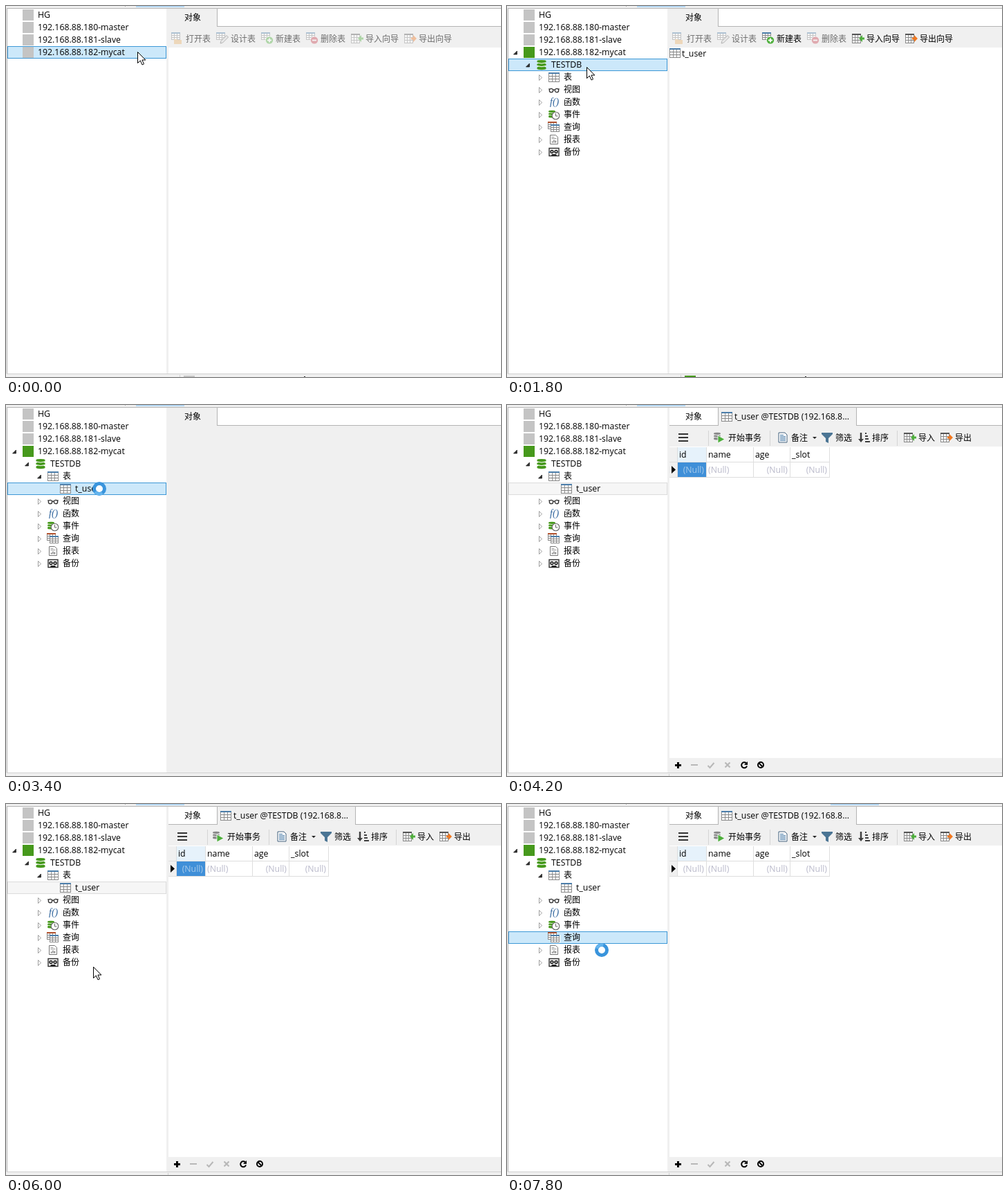
Animation, 716 px wide and 536 px high, one loop 8 s. Source, as an HTML page:

```html
<!DOCTYPE html>
<html lang="zh-CN">
<head>
<meta charset="utf-8">
<title>Database browser</title>
<style>
html, body { margin: 0; width: 100%; height: 100%; overflow: hidden; background: #fff; }
svg { display: block; width: 716px; height: 536px; }
rect { shape-rendering: crispEdges; }
text { font: 12.3px "Open Sans", "Noto Sans", "Noto Sans CJK SC", "Noto Sans CJK", sans-serif; white-space: pre; }
text.cjk { font: 12px "Noto Sans CJK SC", "Noto Sans CJK", sans-serif; }
text.fn { font: italic 14px "Liberation Serif", "Noto Serif", serif; }
</style>
</head>
<body>
<svg id="stage" viewBox="0 0 716 536"></svg>
<script>
const LOOP = 8000, STEP = 200;
const GREEN = '#46991c', GREY = '#c4c4c4', FACE = '#f0f0f0', EDGE = '#b4b4b4', DARK = '#404040';
const ORANGE = '#f07820', LIME = '#4eae3c', BLUE = '#4c7eaa';

const rect = (x, y, w, h, fill) => `<rect x="${x}" y="${y}" width="${w}" height="${h}" fill="${fill}"/>`;
const path = (d, fill = 'none', stroke = 'none', width = 1) =>
  `<path d="${d}" fill="${fill}" stroke="${stroke}" stroke-width="${width}"/>`;
const circle = (x, y, r, fill, stroke = 'none', width = 1) =>
  `<circle cx="${x}" cy="${y}" r="${r}" fill="${fill}" stroke="${stroke}" stroke-width="${width}"/>`;
const text = (x, y, s, fill = '#000', anchor = 'start') =>
  `<text x="${x}" y="${y}" fill="${fill}" text-anchor="${anchor}"${/[\u4e00-\u9fff]/.test(s) ? ' class="cjk"' : ''}>${s}</text>`;
const at = (x, y, body, opacity = 1, scale = 1) =>
  `<g transform="translate(${x} ${y}) scale(${scale})" opacity="${opacity}">${body}</g>`;

// Icons are drawn around the middle of a 16 px box; tables have three by three cells.
const table = (cellW = 4, cellH = 3, head = BLUE) => {
  const w = 3 * cellW + 4, h = 3 * cellH + 5, l = Math.floor(-w / 2), t = Math.floor(-h / 2);
  let s = rect(l, t, w, h, '#8a8a8a') + rect(l, t, w, 2, head);
  for (let r = 0; r < 3; r++)
    for (let c = 0; c < 3; c++)
      s += rect(l + 1 + c * (cellW + 1), t + 2 + r * (cellH + 1), cellW, cellH, '#fff');
  return s;
};
const database = color => [-4.7, 0, 4.7].map(y =>
  path(`M-6.5 ${y - .8}a6.5 1.6 0 0 1 13 0v1.8a6.5 1.6 0 0 1 -13 0z`, color)).join('') +
  path('M-6.5 -3.2q6.5 2.4 13 0M-6.5 1.5q6.5 2.4 13 0', 'none', '#fff', 1);
const page = (w, h, color) =>
  path(`M${-w / 2} ${-h / 2}h${w - 3}l3 3v${h - 3}h${-w}z`, '#fff', color);
const arrow = color => path('M1 -1.5h3v-3.5l5 5l-5 5v-3.5h-3z', color);
const backArrow = color => path('M9 -1.5h-3v-3.5l-5 5l5 5v-3.5h3z', color);
const sheet = at(-2, 0, table(3, 3, '#555'));
const badge = (color, mark) => circle(3, 2.5, 5.5, color, '#fff', .7) + path(mark, 'none', '#fff', 1.8);
const small = at(-2, -3, table(3, 2));

const icons = {
  open: small + path('M-5 1h4l1 1h6v6h-11z', '#eab46c'),
  design: small + path('M-3 7l1 -3.5l8 -8l2.5 2.5l-8 8z', '#e0e0e0', '#555'),
  create: small + badge(LIME, 'M0 2.5h6M3 -.5v6'),
  remove: small + badge('#c84250', 'M0 2.5h6'),
  import: sheet + backArrow(LIME),
  export: sheet + arrow(ORANGE),
  table: table(),
  view: circle(-4, 1, 2.7, '#fff', '#333', 1.3) + circle(4, 1, 2.7, '#fff', '#333', 1.3) +
    path('M-1.4 .5q1.4 -1.4 2.8 0M-7 0v-2M7 0v-2', 'none', '#333', 1.1),
  func: '<text class="fn" x="-6" y="4" fill="#2d629b">f()</text>',
  event: at(-3, -1, database(GREEN), 1, .75) + circle(2.5, 1.5, 5.3, '#fff', '#666', 1.1) + path('M2.5 -2v4h3', 'none', '#666'),
  query: at(-2, -2, table(3, 2, '#b2532f')) + at(2, 2, rect(-6, -6, 13, 12, '#fff') + table(3, 2)),
  report: page(11, 13, '#777') + path('M-3.5 -3.5h4M-3.5 -1.5h7', 'none', '#999') +
    path('M-2.5 4.5v-2M0 4.5v-4M2.5 4.5v-3', 'none', '#555', 1.2),
  backup: path('M-7 -5.5h14v11h-14z', '#fff', '#333', 1.4) + circle(-3, -.5, 1.9, '#fff', '#222', 1.6) +
    circle(3, -.5, 1.9, '#fff', '#222', 1.6) + path('M-4 5l1 -2h6l1 2z', '#222'),
  start: at(-3, -2, database('#888'), 1, .75) + path('M-2 -3l10 5.5l-10 5.5z', LIME, '#fff', .8),
  note: page(12, 14, '#44637e') + path('M-4 -3.5h5M-4 -1.5h8M-4 .5h8M-4 2.5h8M-4 4.5h8', 'none', BLUE),
  filter: path('M-8 -7h16v2l-6 6v7l-4 -2v-5l-6 -6z', '#4b7594'),
  sort: path('M-5 -7v11', 'none', DARK, 2.5) + path('M-9 2h8l-4 5z', DARK) + path('M1 -6h2M1 -2h4M1 2h5M1 6h7', 'none', DARK, 2)
};

const outline = ['HG', '192.168.88.180-master', '192.168.88.181-slave', '192.168.88.182-mycat'];
const folders = [['视图', 'view'], ['函数', 'func'], ['事件', 'event'], ['查询', 'query'], ['报表', 'report'], ['备份', 'backup']];

const stateAt = t => ({
  t,
  connected: t >= 600,
  opened: t >= 1600,
  expanded: t >= 2200,
  loading: t >= 3200 && t < 3800,
  data: t >= 3800,
  querying: t >= 6800,
  emptied: t >= 7400,
  selected: t < 1400 ? 3 : t < 2200 ? 4 : t < 2800 ? 5 : t < 6800 ? 6 : 10
});

function twisty(x, y, isOpen) {
  return isOpen ? path(`M${x + 5.5} ${y - 2}v5h-5z`, '#333', '#000', .6)
    : path(`M${x + .5} ${y - 3.5}l4 4l-4 4z`, '#fff', '#a0a0a0');
}

function tree(s) {
  const rowY = i => 13 + 18 * i;
  const idle = s.data && !s.querying;
  const top = rowY(s.selected) - 9;
  let out = rect(2, top, 230, 18, idle ? '#dcdcdc' : '#3d98d6') + rect(3, top + 1, 228, 16, idle ? '#f6f6f6' : '#cce8fa');
  outline.forEach((name, i) => {
    out += rect(24, rowY(i) - 8, 16, 16, i === 3 && s.connected ? GREEN : GREY) + text(46, rowY(i) + 4, name);
  });
  if (!s.connected) return out;
  out += twisty(9, 67, true) + at(50, 85, database(s.opened ? GREEN : GREY)) + text(64, 89, 'TESTDB');
  if (!s.opened) return out;
  out += twisty(27, 85, true) + twisty(s.expanded ? 45 : 46, 103, s.expanded) + at(68, 103, icons.table) + text(82, 107, '表');
  if (s.expanded) out += at(86, 121, icons.table) + text(100, 125, 't_user');
  folders.forEach(([name, icon], i) => {
    const y = rowY(i + (s.expanded ? 7 : 6));
    if (!(icon === 'query' && s.emptied)) out += twisty(46, y, false);
    out += at(68, y, icons[icon]) + text(82, y + 4, name);
  });
  return out;
}

function objectPane(s) {
  let out = rect(235, 4, 70, 56, FACE) + rect(305, 4, 411, 26, '#fff') +
    rect(305, 4, 1, 26, EDGE) + rect(305, 29, 411, 1, EDGE) + text(258, 21, '对象');
  if (s.loading) return out;
  out += rect(235, 60, 481, 471, '#fff');
  const tools = [['open', '打开表', 240], ['design', '设计表', 305], ['create', '新建表', 370, 1],
    ['remove', '删除表', 435], ['import', '导入向导', 500, 1], ['export', '导出向导', 577, 1]];
  for (const [icon, label, x, usable] of tools) {
    const on = usable && s.opened;
    out += at(x + 8, 47, icons[icon], on ? 1 : .4) + text(x + 20, 52, label, on ? '#000' : '#6d6d6d');
  }
  if (s.opened) out += at(243, 68, icons.table) + text(253, 73, 't_user');
  return out + rect(251, 533, 1, 3, '#d0d0d0') + rect(257, 534, 16, 2, s.connected ? GREEN : GREY) + rect(431, 535, 2, 1, '#333');
}

function dataPane(s) {
  let out = rect(235, 4, 481, 26, '#fff') + rect(235, 29, 481, 1, EDGE) + rect(305, 4, 201, 26, EDGE) +
    rect(306, 4, 199, 26, FACE) + text(258, 21, '对象') + at(318, 17, icons.table) +
    text(329, 21, 't_user @TESTDB (192.168.8...') + rect(235, 60, 481, 450, '#fff');

  for (const y of [41, 46, 51]) out += rect(248, y, 14, 2, '#333');
  for (const x of [291, 380, 564]) out += rect(x, 37, 1, 22, '#d4d4d4');
  const tools = [['start', 307, '开始事务', 320], ['note', 399, '备注', 411], ['filter', 463, '筛选', 475],
    ['sort', 517, '排序', 528], ['import', 583, '导入', 595], ['export', 636, '导出', 648]];
  for (const [icon, x, label, tx] of tools) out += at(x, 47, icons[icon]) + text(tx, 52, label);
  out += path('M442 46h6l-3 3z', '#222');

  const edges = [246, 288, 356, 409, 466];
  out += rect(235, 61, 11, 43, FACE) + rect(247, 61, 41, 21, '#e6f2fb');
  for (const y of [82, 104]) out += rect(235, y, 232, 1, '#dedede');
  for (const x of edges) out += rect(x, 61, 1, 43, '#dedede');
  if (!s.querying) out += rect(247, 83, 41, 21, '#3f8fd8');
  ['id', 'name', 'age', '_slot'].forEach((name, i) => {
    const left = i === 1;
    out += text(edges[i] + 3, 76, name) + text(left ? 291 : edges[i + 1] - 3, 98, '(Null)',
      i === 0 && !s.querying ? '#a9cbea' : '#b9b9ca', left ? 'start' : 'end');
  });
  out += path('M238 88l6 5.5l-6 5.5z', '#000');

  out += rect(235, 510, 481, 21, FACE) + rect(243, 519, 9, 3, '#000') + rect(246, 516, 3, 9, '#000') +
    rect(266, 519, 10, 2, '#b8b8b8') + path('M290.5 521l3 3l6 -7', 'none', '#b8b8b8', 2) +
    path('M315.5 516.5l7 7m0 -7l-7 7', 'none', '#b8b8b8', 2.2) +
    path('M346 517.5a4 4 0 1 0 1 4', 'none', '#000', 2) + path('M348 515v5h-5z', '#000') +
    circle(367, 520, 4, 'none', '#000', 2) + path('M364 517l6 6', 'none', '#000', 2);
  return out + rect(234, 533, 1, 3, '#d0d0d0');
}

// Pointer stops as time, x, y; it leaves the stage between the two outer runs.
const runs = [
  [[0, 190, 66], [400, 190, 66], [1200, 117, 88], [1800, 115, 88], [2400, 111, 102], [2800, 127, 115], [3600, 127, 115]],
  [[5400, 235, 480], [6000, 126, 235], [6200, 126, 235], [6800, 97, 193], [7200, 137, 211], [8000, 137, 211]]
];

function pointer(s) {
  const { t } = s;
  if (t >= 3200 && t <= 3600) return busy(135, 121, t);
  if (s.emptied) return busy(137, 211, t);
  const run = runs.find(r => t >= r[0][0] && t <= r[r.length - 1][0]);
  if (!run) return '';
  const i = Math.max(1, run.findIndex(p => p[0] >= t));
  const [a, b] = [run[i - 1], run[i]];
  const k = (t - a[0]) / (b[0] - a[0]);
  return at(a[1] + k * (b[1] - a[1]), a[2] + k * (b[2] - a[2]),
    path('M.5 .5v16l3.8 -3.6l2.7 6l2.5 -1.1l-2.6 -5.8h5z', '#fff', '#000'));
}

const busy = (x, y, t) => at(x, y, circle(0, 0, 7.5, '#fff', '#3994dc', 5) +
  `<g transform="rotate(${t * .36})">${path('M0 -7.5a7.5 7.5 0 0 1 7.5 7.5', 'none', '#65b5ee', 4)}</g>`);

function draw(t) {
  const s = stateAt(t);
  return rect(0, 0, 716, 536, FACE) + rect(s.querying ? 468 : 188, 0, 70, 2, '#b5d7f3') + rect(172, 0, 1, 1, '#aaa') +
    rect(1, 3, 715, 1, EDGE) + rect(1, 3, 1, 529, EDGE) + rect(2, 4, 230, 527, '#fff') +
    tree(s) + (s.data ? dataPane(s) : objectPane(s)) + rect(1, 531, 715, 1, '#d0d0d0') + pointer(s);
}

const stage = document.getElementById('stage');
const begin = performance.now();
let shown = -1;
function tick() {
  const step = Math.floor((performance.now() - begin) % LOOP / STEP);
  if (step !== shown) {
    shown = step;
    stage.innerHTML = draw(step * STEP);
  }
  requestAnimationFrame(tick);
}
tick();
</script>
</body>
</html>
```
